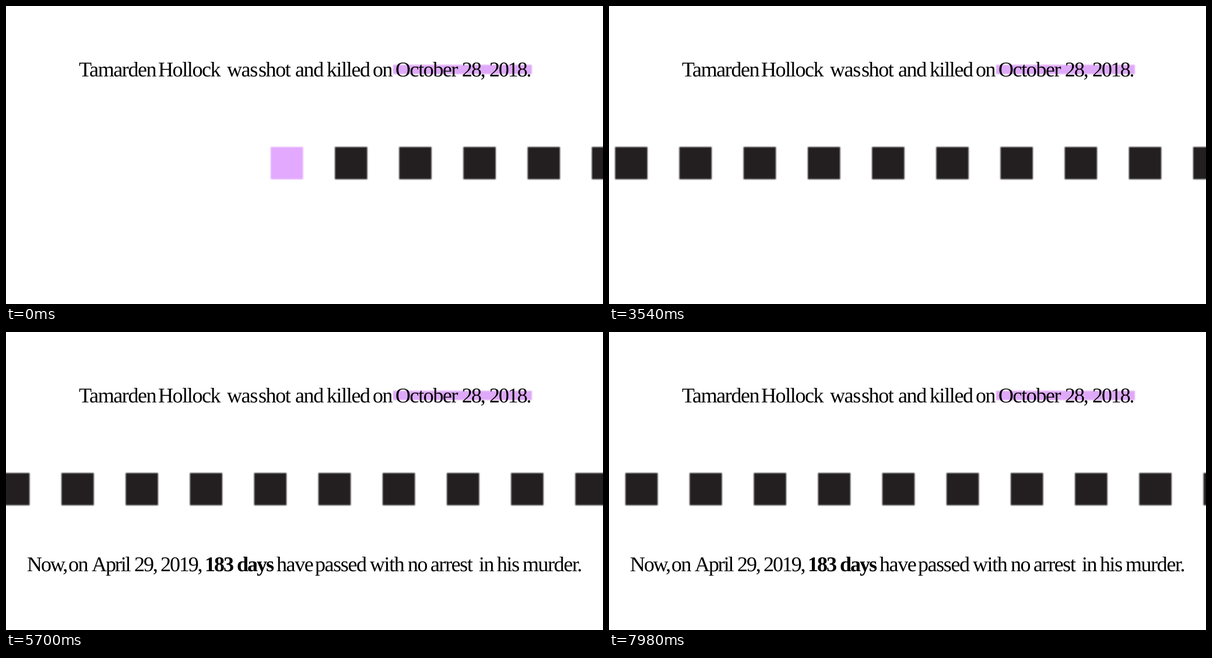
Write an HTML page that moves like this. It is 1024 px wide and 512 px high and loops after 8 s.

```html
<!DOCTYPE html>
<html lang="en">
<head>
<meta charset="utf-8">
<title>Days without an arrest</title>
<style>
  html, body { margin: 0; width: 100%; height: 100%; overflow: hidden; background: #fff; }
  svg { display: block; width: 1024px; height: 512px; }
  text { font: 36px "Liberation Serif", "Times New Roman", serif; letter-spacing: -1.4px; text-rendering: geometricPrecision; }
  .tight { letter-spacing: -2.1px; }
  .count { font-weight: bold; letter-spacing: -2px; }
  .mark { fill: #dfa9f9; filter: blur(1.2px); }
  #row { filter: blur(0.9px); }
</style>
</head>
<body>
<svg viewBox="0 0 1024 512">
  <rect class="mark" x="664" y="101" width="238" height="16"/>
  <text y="121">
    <tspan x="125">Tamarden</tspan> <tspan x="261">Hollock</tspan>
    <tspan x="379">was</tspan> <tspan x="433">shot</tspan> <tspan x="496">and</tspan>
    <tspan x="550">killed</tspan> <tspan x="629">on</tspan> <tspan x="668">October</tspan>
    <tspan class="tight" x="782">28,</tspan> <tspan class="tight" x="829">2018.</tspan>
  </text>
  <g id="row"></g>
  <text id="result" y="411" opacity="0">
    <tspan class="tight" x="36">Now,</tspan> <tspan x="107">on</tspan> <tspan class="tight" x="147">April</tspan>
    <tspan class="tight" x="220">29,</tspan> <tspan class="tight" x="265">2019,</tspan>
    <tspan class="count" x="341">183</tspan> <tspan class="count" x="396">days</tspan>
    <tspan x="464">have</tspan> <tspan x="530">passed</tspan> <tspan x="624">with</tspan> <tspan x="689">no</tspan>
    <tspan x="728">arrest</tspan> <tspan x="811">in</tspan> <tspan x="842">his</tspan> <tspan x="886">murder.</tspan>
  </text>
</svg>
<script>
const LOOP = 8000, STEP = 30;
const SIZE = 55.5, PITCH = 110.17, START = 454, SPEED = 66.15;
const SCROLL_AT = 1740, FADE_AT = 4200, FADE = 900;
const SEAM = 92, SEAM_GAP = 2.7; // the strip is joined halfway with a slightly wider gap

const row = document.getElementById('row');
const result = document.getElementById('result');
const clamp = v => Math.min(1, Math.max(0, v));

const squares = Array.from({ length: 12 }, () => {
  const r = document.createElementNS('http://www.w3.org/2000/svg', 'rect');
  r.setAttribute('y', 242.2);
  r.setAttribute('width', SIZE);
  r.setAttribute('height', SIZE);
  return row.appendChild(r);
});

function draw(now) {
  const t = Math.floor((now % LOOP) / STEP) * STEP;
  const left = START - SPEED * Math.max(0, t - SCROLL_AT) / STEP;
  const first = Math.max(0, Math.floor((-left - SIZE - SEAM_GAP) / PITCH));
  squares.forEach((r, i) => {
    const day = first + i;
    r.setAttribute('x', left + day * PITCH + (day >= SEAM ? SEAM_GAP : 0));
    r.setAttribute('fill', day ? '#231f20' : '#e3a9ff');
  });
  result.setAttribute('opacity', clamp((t - FADE_AT) / FADE));
}

const begin = performance.now();
function tick() {
  draw(performance.now() - begin);
  requestAnimationFrame(tick);
}
tick();
</script>
</body>
</html>
```
